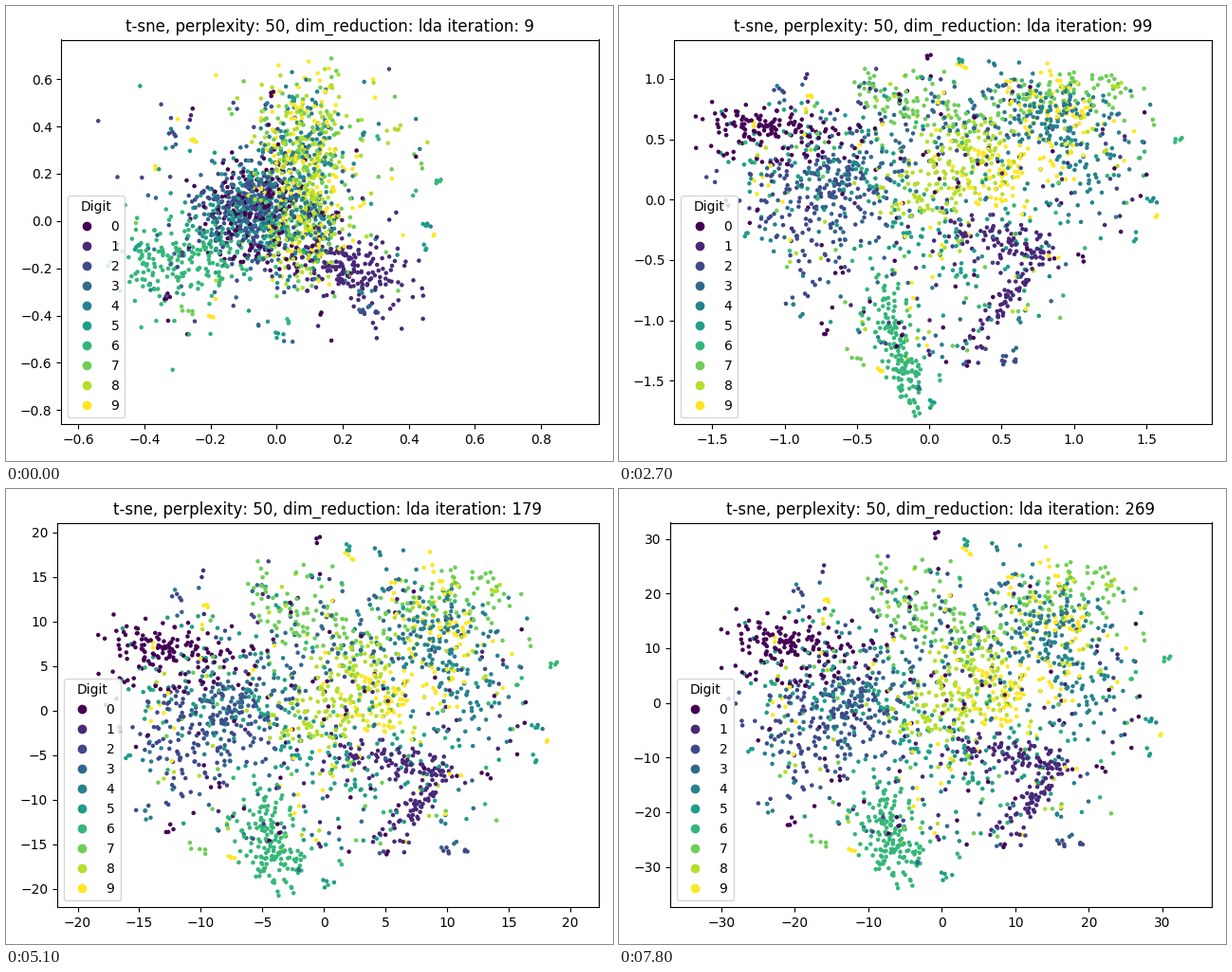
Animation, 640 px wide and 480 px high, one loop 8000 ms. Source, as a matplotlib script:

```python
import numpy as np
import matplotlib.pyplot as plt
from matplotlib.animation import FuncAnimation

WIDTH, HEIGHT, DPI = 640, 480, 100
FRAMES, INTERVAL, HOLD = 80, 100, 3
PER_DIGIT, STRAY_SHARE, CLUMPS = 200, 0.22, 45
AXES_TOP = 35.5
plt.rcParams["text.kerning_factor"] = 6
rng = np.random.default_rng(50)

# Axis limits (left, right, bottom, top) at key steps.
LIMITS = {
    0: (-0.652, 0.975, -0.860, 0.767),
    5: (-1.762, 1.952, -1.832, 1.230),
    9: (-1.762, 1.952, -1.862, 1.326),
    13: (-12.48, 12.79, -12.91, 13.00),
    17: (-21.66, 22.31, -22.07, 21.10),
    22: (-31.20, 30.75, -31.40, 28.30),
    26: (-36.97, 36.72, -37.40, 32.95),
}

# Arms of the first, tangled cloud: start, end and thickness in stage pixels.
CORE = [(268, 208), (248, 225)], 26
UP = [(318, 105), (312, 265)], 21
LEFT = [(140, 276), (255, 255)], 18
RIGHT = [(400, 290), (320, 258)], 17

# Each digit's arm, its path in the opened cloud and the path's thickness.
DIGITS = [
    (CORE, [(115, 172), (150, 176), (185, 182), (245, 178)], 18),
    (RIGHT, [(400, 365), (435, 335), (460, 295), (405, 285), (335, 287)], 9),
    (CORE, [(150, 245), (235, 235), (190, 318)], 27),
    (CORE, [(235, 270), (250, 215), (425, 140)], 32),
    (UP, [(485, 240), (475, 170), (415, 140)], 27),
    (CORE, [(145, 212), (250, 210), (330, 290), (420, 290)], 36),
    (LEFT, [(295, 407), (265, 375), (270, 325)], 16),
    (UP, [(270, 112), (295, 145), (380, 165), (470, 108), (515, 118)], 16),
    (UP, [(300, 242), (345, 245), (385, 165)], 25),
    (UP, [(435, 115), (475, 145), (420, 238), (365, 225)], 19),
]


def along(path, u):
    knots = np.linspace(0, 1, len(path))
    return np.column_stack([np.interp(u, knots, c) for c in np.transpose(path)])


def on_disc(radius):
    """Points of the opened cloud at the given share of its radius."""
    angle = rng.uniform(0, 2 * np.pi, len(radius))
    return np.column_stack([340 + 252 * radius * np.cos(angle),
                            238 + 182 * radius * np.sin(angle)])


def digit_points(arm, path, thickness):
    u = rng.random(PER_DIGIT)
    noise = rng.normal(size=(PER_DIGIT, 2))
    stray = rng.random(PER_DIGIT) < STRAY_SHARE
    arm_path, arm_thickness = arm
    width = arm_thickness * np.where(stray, 2.2, 1)
    tangled = along(arm_path, u) + noise * width[:, None]
    opened = along(path, u) + noise * thickness
    opened[stray] = on_disc(0.85 * np.sqrt(rng.random(stray.sum())))
    return tangled, opened


def rim_clumps():
    """Small tight groups around the edge of the cloud."""
    sizes = rng.integers(1, 5, CLUMPS)
    centres = np.repeat(on_disc(rng.uniform(0.8, 1, CLUMPS)), sizes, axis=0)
    opened = centres + rng.normal(0, 3, centres.shape)
    tangled = np.array([290, 220]) + 0.7 * (opened - (340, 238))
    return np.repeat(rng.integers(0, 10, CLUMPS), sizes), tangled, opened


def fan(points):
    """Lift the middle and narrow the bottom: a triangle on its tip."""
    x, y = points.T
    narrow = 1.05 - 0.6 * (np.maximum(y - 200, 0) / 210) ** 2
    lift = 50 * np.sin(np.pi * np.clip((y - 50) / 360, 0, 1))
    return np.column_stack([325 + (x - 325) * narrow, y - lift])


def build():
    clouds = [digit_points(*row) for row in DIGITS]
    clump_digits, *clumps = rim_clumps()
    tangled, opened = (np.concatenate(c) for c in zip(*clouds, clumps))
    digits = np.append(np.repeat(np.arange(10), PER_DIGIT), clump_digits)
    order = rng.permutation(len(digits))
    return digits[order], tangled[order], opened[order]


digits, tangled, opened = build()
fanned = fan(opened)
settled = opened * (0.97, 0.99) + (18, -7)


def blend(a, b, t):
    return a + (b - a) * t


def positions(step):
    if step <= 5:
        return blend(tangled, fanned, 1 - (1 - step / 5) ** 1.6)
    if step <= 13:
        return blend(fanned, opened, max(step - 9, 0) / 4)
    return blend(opened, settled, (step - 13) / 13)


def limits(step):
    return [np.interp(step, list(LIMITS), side) for side in zip(*LIMITS.values())]


fig, ax = plt.subplots(figsize=(WIDTH / DPI, HEIGHT / DPI), dpi=DPI)
dots = ax.scatter(*tangled.T, c=digits, s=5)
ax.legend(*dots.legend_elements(num=None), loc="lower left", title="Digit")


def update(frame):
    step = frame // HOLD
    left, right, bottom, top = limits(step)
    ax.set(xlim=(left, right), ylim=(bottom, top),
           title="t-sne, perplexity: 50, dim_reduction: lda "
                 f"iteration: {9 + 10 * step}")
    fig.tight_layout()
    fig.subplots_adjust(top=1 - AXES_TOP / HEIGHT)
    # Stage pixels to axes fractions, then to data units.
    box = ax.get_position()
    x, y = positions(step).T
    fx = (x / WIDTH - box.x0) / box.width
    fy = (1 - y / HEIGHT - box.y0) / box.height
    dots.set_offsets(np.column_stack([blend(left, right, fx),
                                      blend(bottom, top, fy)]))
    return dots,


anim = FuncAnimation(fig, update, frames=FRAMES, interval=INTERVAL,
                     repeat=True, repeat_delay=0, blit=False)
plt.show()
```
